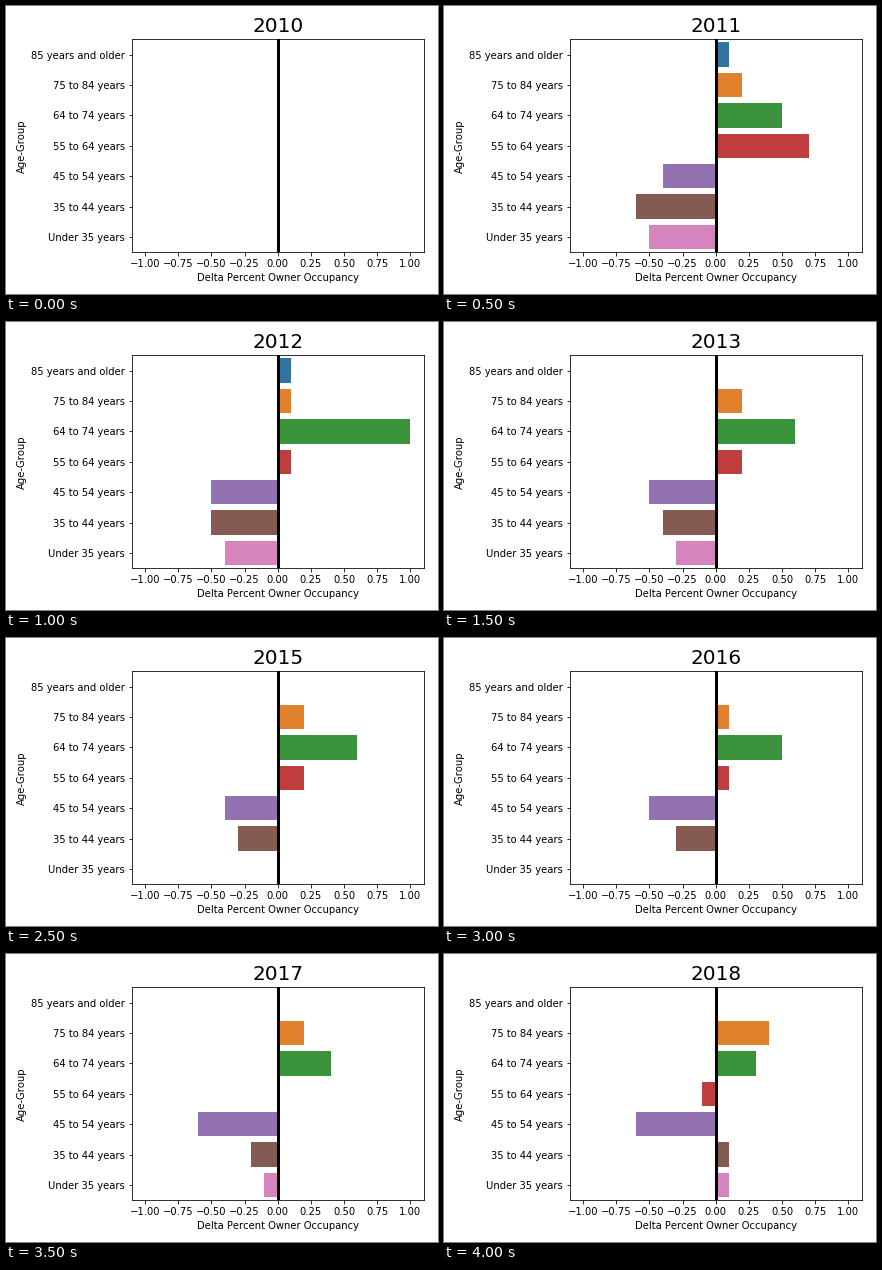
Recreate the animation shown at these times as a matplotlib script. Size 432 by 288 pixels, loop 4.5 s.

```python
import numpy as np
import matplotlib.pyplot as plt
from matplotlib.animation import FuncAnimation

W, H, DPI = 432, 288, 72
FIRST_YEAR, YEARS = 2010, 9
STEP_MS = 500

# Turning points of each group: {years since start: change in tenths}
TRENDS = {
    "85 years and older": {0: 0, 1: 1, 2: 1, 4: 0},
    "75 to 84 years": {0: 0, 1: 2, 2: 1, 4: 2, 6: 1, 8: 4},
    "64 to 74 years": {0: 0, 1: 5, 2: 10, 3: 6, 4: 7, 8: 3},
    "55 to 64 years": {0: 0, 1: 7, 2: 1, 4: 2, 6: 1, 8: -1},
    "45 to 54 years": {0: 0, 1: -4, 4: -6, 5: -4, 7: -6},
    "35 to 44 years": {0: 0, 1: -6, 4: -3, 6: -3, 7: -2, 8: 1},
    "Under 35 years": {0: 0, 1: -5, 4: -2, 5: 0, 6: 0, 7: -1, 8: 1},
}
COLORS = ["#3274a1", "#e1812c", "#3a923a", "#c03d3e",
          "#9372b2", "#845b53", "#d684bd"]

plt.rcParams["font.family"] = "DejaVu Sans"
plt.rcParams["font.size"] = 10
plt.rcParams["text.kerning_factor"] = 6


def delta(trend, year):
    """Interpolate between turning points, rounded to one decimal."""
    return np.round(np.interp(year, list(trend), list(trend.values()))) / 10


fig = plt.figure(figsize=(W / DPI, H / DPI), dpi=DPI, facecolor="white")
left, right, top, bottom = 125.73, 417.67, 33.3, 246.3
ax = fig.add_axes([left / W, 1 - bottom / H,
                   (right - left) / W, (bottom - top) / H])

rows = np.arange(len(TRENDS))
bars = ax.barh(rows, 0 * rows, height=0.8, color=COLORS, linewidth=0)
ax.axvline(0, color="black", linewidth=3)

ax.set_xlim(-1.1, 1.1)
ax.set_ylim(len(TRENDS) - 0.5, -0.5)
ax.set_xticks(np.linspace(-1, 1, 9))
ax.xaxis.set_major_formatter("{x:.2f}")
ax.set_yticks(rows, list(TRENDS))
ax.set_xlabel("Delta Percent Owner Occupancy")
ax.set_ylabel("Age-Group")
title = ax.set_title(str(FIRST_YEAR), fontsize=20, pad=7.3)


def update(year):
    for bar, trend in zip(bars, TRENDS.values()):
        bar.set_width(delta(trend, year))
    title.set_text(str(FIRST_YEAR + year))
    return [*bars, title]


anim = FuncAnimation(fig, update, frames=YEARS, interval=STEP_MS,
                     init_func=lambda: update(0), repeat=True,
                     repeat_delay=0, blit=False)
plt.show()
```
